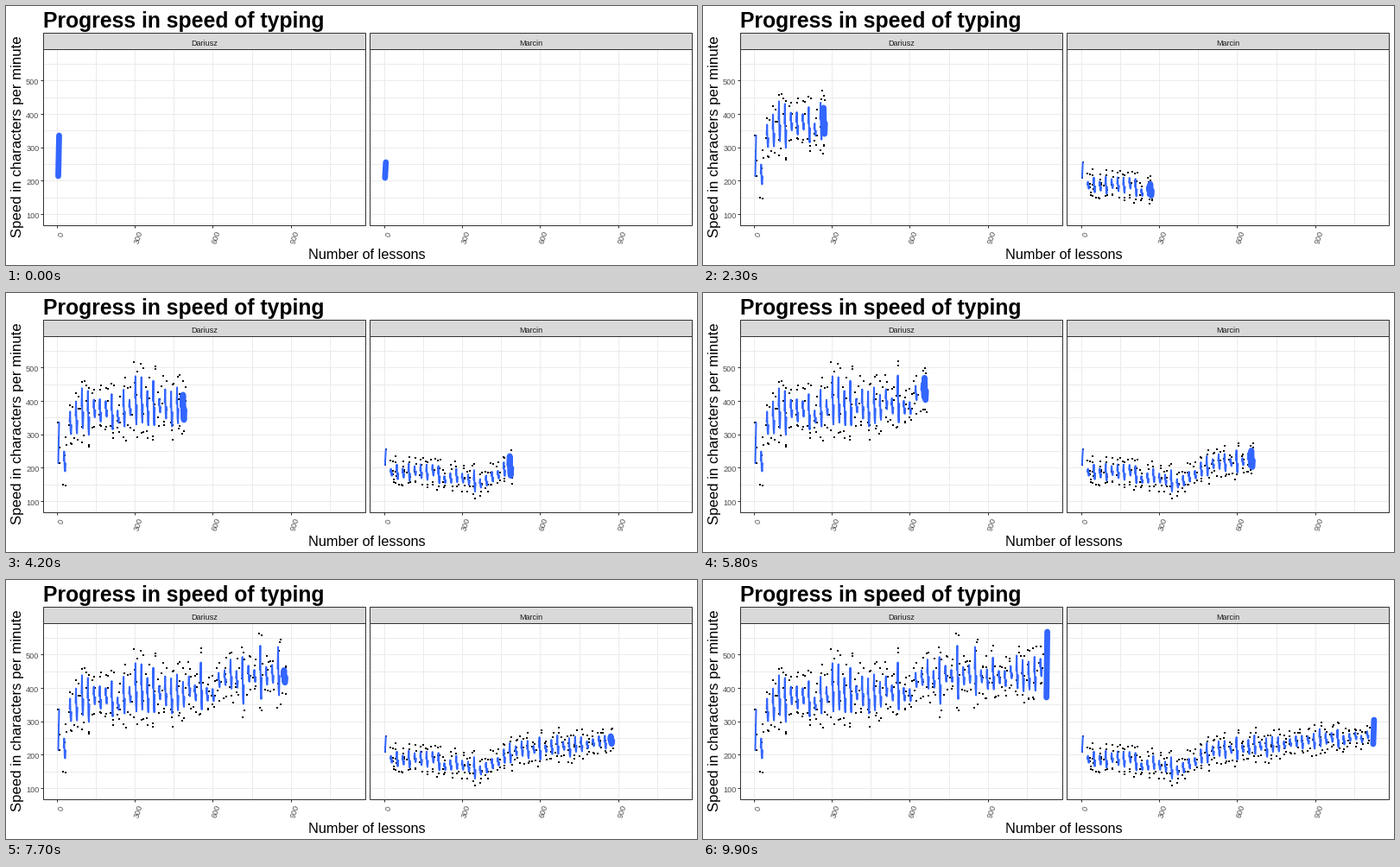
Animation, 800 px wide and 300 px high, one loop 10 s. Source, as a matplotlib script:

```python
import numpy as np
import matplotlib.pyplot as plt
from matplotlib.animation import FuncAnimation
from matplotlib.collections import LineCollection
from matplotlib.patches import Rectangle

FRAMES, GROUPS, STEP = 100, 50, 6.88
PT = 0.72  # points per pixel at 100 dpi
BLUE, DARK, GRID = "#3366FF", "#333333", "#EBEBEB"
plt.rcParams["font.family"] = "Liberation Sans"

fig = plt.figure(figsize=(8, 3), dpi=100, facecolor="white")
ax = fig.add_axes([0, 0, 1, 1])
ax.set(xlim=(0, 800), ylim=(300, 0))
ax.axis("off")


def text(x, y, s, px, **kw):
    kw = {"ha": "center", "va": "baseline", "color": "black", **kw}
    ax.text(x, y, s, fontsize=px * PT, **kw)


def rule(xs, ys, color, z):
    ax.plot(xs, ys, color=color, lw=PT, zorder=z, solid_capstyle="butt")


def box(x, y, w, h, fill, z):
    ax.add_patch(Rectangle((x, y), w, h, fc=fill, ec=DARK, lw=PT, zorder=z))


def speed_y(v):
    return 241 - 0.3865 * (v - 100)


def draw_panel(left, zero, name):
    right = left + 373
    for v in range(100, 551, 50):
        rule([left, right], [speed_y(v)] * 2, GRID, 1)
    for n in range(0, 1051, 150):
        x = zero + 0.3007 * n
        rule([x, x], [50, 254], GRID, 1)
        if n % 300 == 0:
            rule([x, x], [254, 257], DARK, 1)
            dx, y = (5, 264.5) if n == 0 else (4.5, 268)
            text(x + dx, y, str(n), 9.2, rotation=72, va="center", color="#4D4D4D")
    box(left, 50, 373, 204, "none", 6)
    box(left, 31, 373, 19, "#D9D9D9", 6)
    text(left + 187, 46, name, 9, color="#1A1A1A", zorder=7)


draw_panel(43, 59, "Dariusz")
draw_panel(421, 438, "Marcin")
for v in range(100, 501, 100):
    rule([40, 43], [speed_y(v)] * 2, DARK, 1)
    text(38.5, speed_y(v) + 4.5, str(v), 9.2, ha="right", color="#4D4D4D")
text(43, 25, "Progress in speed of typing", 24.8, ha="left", weight="bold")
text(417.5, 293, "Number of lessons", 16.2)
text(13.5, 151.5, "Speed in characters per minute", 16.7, rotation=90, va="center")


class Series:
    """Lines and dots scattered around a trend, one set per lesson group."""

    ZIGZAG = np.array([0.55, 1, 0.15, 0, 0.4])
    CLIMB = np.linspace(0, 1, 5)

    def __init__(self, x0, trend, ends, height, jitter, spread, seed):
        rng = np.random.default_rng(seed)
        middle = np.interp(np.arange(GROUPS), *zip(*trend))
        paths, dots = [], []
        for i, mid in enumerate(middle):
            x = x0 + STEP * i
            if i in (0, GROUPS - 1):
                size, gap, half, share = ends[i > 0], 0, 0.5, self.CLIMB
            else:
                size = height[0] + (height[1] - height[0]) * rng.random() ** 2
                mid += rng.uniform(-jitter, jitter)
                gap, half, share = spread, 1.1, self.ZIGZAG
            top, bottom = mid - size / 2, mid + size / 2
            xs = x + half * np.linspace(-1, 1, 5)
            paths.append(np.column_stack([xs, bottom - size * share]))
            ys = np.concatenate([top - gap * rng.uniform(0.15, 1, 2),
                                 bottom + gap * rng.uniform(0.15, 1, 2),
                                 rng.uniform(top, bottom, 2)])
            dx = rng.uniform(-2.6, 2.6, 6) * (1 if gap else 0.3)
            dots.append(np.column_stack([x + dx, ys]))
        self.paths, self.dots = np.array(paths), np.array(dots)
        self.trail = LineCollection([], colors=BLUE, linewidths=2 * PT,
                                    capstyle="round", joinstyle="round", zorder=4)
        ax.add_collection(self.trail)
        self.marks, = ax.plot([], [], "s", ms=2 * PT, mew=0, color="black", zorder=3)
        self.now, = ax.plot([], [], color=BLUE, lw=6.8 * PT, zorder=5,
                            solid_capstyle="round", solid_joinstyle="round")

    def show(self, t):
        i = min(int(t), GROUPS - 1)
        j, f = min(i + 1, GROUPS - 1), t - i
        path = (1 - f) * self.paths[i] + f * self.paths[j]
        moving = (1 - f) * self.dots[i] + f * self.dots[j]
        past = i + 1 if f > 0 else i
        self.trail.set_segments(list(self.paths[:past]))
        shown = np.vstack([self.dots[:past].reshape(-1, 2), moving])
        self.marks.set_data(shown[:, 0], shown[:, 1])
        self.now.set_data(path[:, 0], path[:, 1])


# trend: (group, y) key points; ends: line heights of first and last group
series = [
    Series(61, [(0, 173.5), (1, 191), (2, 144), (5, 133), (10, 137), (15, 127),
                (25, 130), (30, 112), (40, 111), (48, 106), (49, 98)],
           ends=(47, 76), height=(14, 62), jitter=7, spread=17, seed=4),
    Series(439.3, [(0, 190), (1, 206), (4, 209), (8, 205), (10, 217), (12, 210),
                   (16, 219), (20, 206), (23, 196), (33, 191), (38, 186),
                   (48, 182), (49, 176)],
           ends=(18, 28), height=(8, 26), jitter=2.5, spread=10, seed=9),
]
stops = np.round(np.arange(GROUPS) * (FRAMES - 1) / (GROUPS - 1))


def update(frame):
    t = np.interp(frame, stops, np.arange(GROUPS))
    for s in series:
        s.show(t)
    return []


anim = FuncAnimation(fig, update, frames=FRAMES, init_func=lambda: update(0),
                     interval=100, repeat=True, repeat_delay=0, blit=False)
plt.show()
```
